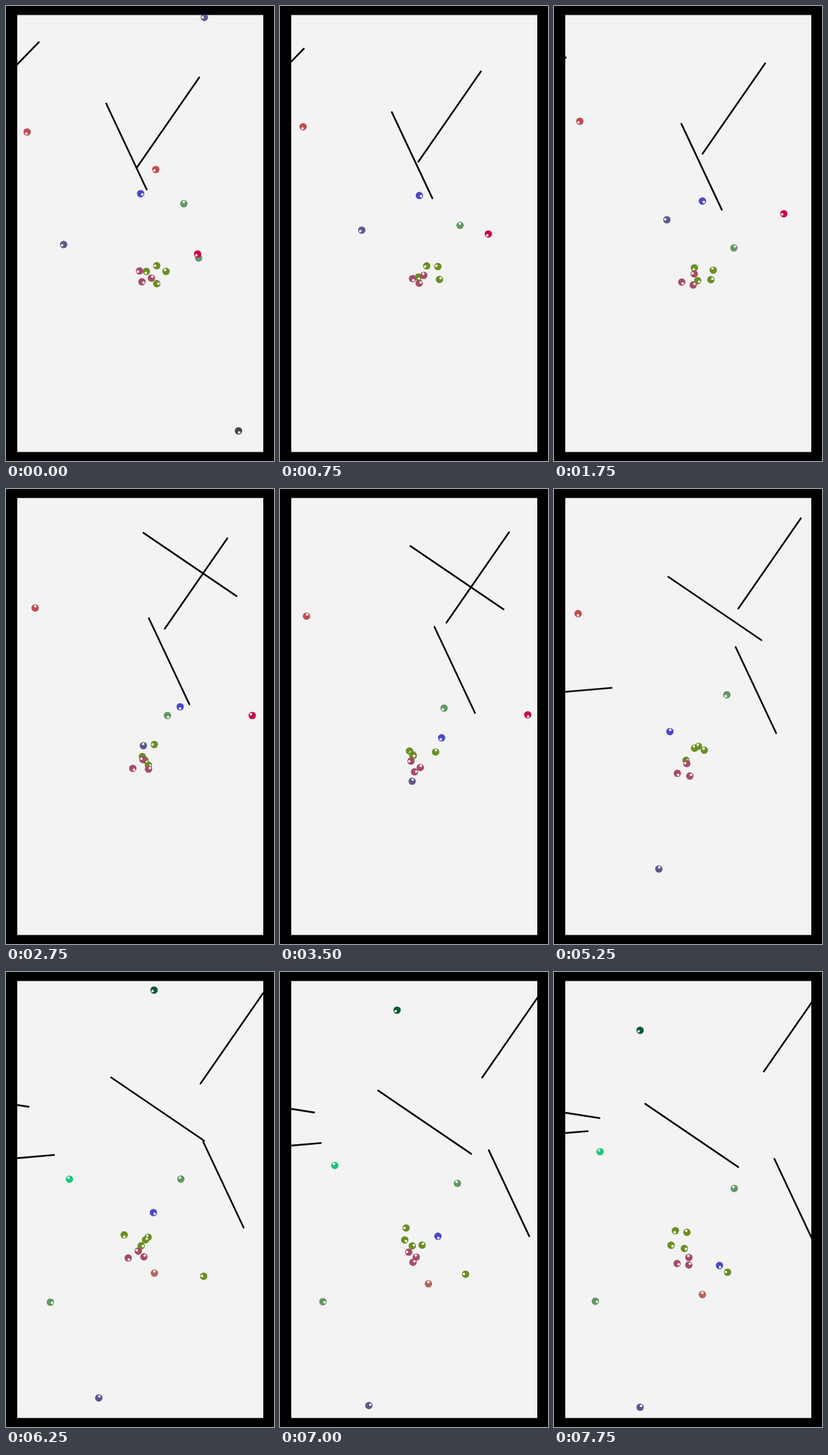
An HTML page with a canvas that plays this animation: 400 px wide and 679 px high, repeating every 8000 ms.

```html
<!DOCTYPE html>
<html lang="en">
<head>
<meta charset="utf-8">
<title>Balls and drifting lines</title>
<style>
  html, body { margin: 0; width: 100%; height: 100%; overflow: hidden; background: #000; }
  canvas { display: block; }
</style>
</head>
<body>
<canvas id="stage" width="400" height="679"></canvas>
<script>
const ctx = document.getElementById("stage").getContext("2d");
const LOOP = 8, STEP = 0.25, TAU = Math.PI * 2;
const OLIVE = "#6b8e23", MAUVE = "#a64c64", NAVY = "#5a5a8c", GREEN = "#649664", RED = "#c24c54";
const FORWARD = 1, BACKWARD = -1; // side of the highlight, relative to the motion

let seed = 7;
const random = () => (seed = seed * 16807 % 2147483647) / 2147483647;

const balls = [], lines = [];
const addBall = (color, facing, position, from = 0, to = LOOP) =>
  balls.push({ color, facing, position, from, to });

// Constant velocity, starting at (x, y) when it appears
function drifter(color, facing, [x, y], [vx, vy], from, to) {
  addBall(color, facing, t => [x + vx * (t - from), y + vy * (t - from)], from, to);
}

// Balls spread around a slowly drifting centre, each on its own wobbly orbit
function swarm(color, count, [cx, cy], [vx, vy], radius) {
  for (let i = 0; i < count; i++) {
    const phase = TAU * i / count, spin = 1 + random(), wobble = TAU * random();
    addBall(color, BACKWARD, t => {
      const r = radius * (0.8 + 0.3 * Math.sin(2 * t + wobble));
      const angle = phase + spin * t;
      return [cx + vx * t + r * Math.cos(angle), cy + vy * t + r * 0.8 * Math.sin(angle)];
    });
  }
}

// Smooth path through a few points at the shared key times
const KEY_TIMES = [0, 1.75, 2.75, 4.25, 5.25, 6.25, 7.75];
function traveller(color, facing, points, to) {
  const last = points.length - 1;
  const slope = (i, k) => {
    const a = Math.max(i - 1, 0), b = Math.min(i + 1, last);
    return (points[b][k] - points[a][k]) / (KEY_TIMES[b] - KEY_TIMES[a]);
  };
  addBall(color, facing, t => {
    const time = Math.min(Math.max(t, 0), KEY_TIMES[last]);
    let i = 0;
    while (i < last - 1 && KEY_TIMES[i + 1] <= time) i++;
    const span = KEY_TIMES[i + 1] - KEY_TIMES[i], u = (time - KEY_TIMES[i]) / span, v = 1 - u;
    return [0, 1].map(k =>
      points[i][k] * v * v * (1 + 2 * u) + points[i + 1][k] * u * u * (3 - 2 * u)
      + span * u * v * (slope(i, k) * v - slope(i + 1, k) * u));
  }, 0, to);
}

const addLine = (start, extent, velocity, from = 0, to = LOOP) =>
  lines.push({ start, extent, velocity, from, to });

addLine([149.5, 145.5], [60.5, 128.5], [23.15, 17.2]);
addLine([195, 241.5], [93.5, -135], [15.25, -12]);
addLine([49, 54], [-80, 82], [-18, 13], 0, 2);
addLine([243, -6.8], [139, 94.5], [-13.8, 26.25], 2.5);
addLine([160.8, 421.5], [-140, 12], [-14.25, -23.75], 5.25);
addLine([-108, 130.5], [-140, -22], [22.7, 11.3], 5.5);

drifter(NAVY, BACKWARD, [296, 17], [20, 0], 0, 0.25);
drifter("#48484a", FORWARD, [347, 634], [28, 62], 0, 0.5);
drifter(RED, BACKWARD, [223.5, 244], [15, -10], 0, 0.75);
drifter(GREEN, BACKWARD, [287.5, 376], [0, 14], 0, 0.75);
drifter(GREEN, BACKWARD, [67, 493], [-3, -1], 6, 8);
drifter("#14c878", FORWARD, [99, 316], [-17.3, -27.3], 6, 8);
drifter("#0a5a32", FORWARD, [221, 27], [-61.7, 40], 6.25, 8);
drifter("#b4645c", BACKWARD, [221.5, 444], [0, 21.3], 6, 8);
drifter(OLIVE, FORWARD, [295, 454], [-24, -4], 6.25, 8);

swarm(OLIVE, 4, [225, 396], [-4.2, 0], 21);
swarm(MAUVE, 3, [207, 406], [-1.5, 3], 14);

traveller(RED, BACKWARD, [[31.5, 188], [38.5, 172], [43.5, 177.5], [35, 199], [36, 186]], 5.75);
traveller("#c8064f", BACKWARD, [[286, 370], [343, 310], [367.5, 338], [368.5, 331]], 4.75);
traveller(GREEN, BACKWARD, [[265.5, 295], [268.5, 361], [241, 338], [253.5, 318], [258, 307], [261, 309], [269, 323]]);
traveller(NAVY, BACKWARD, [[86, 356], [168.5, 319], [205, 383], [180.5, 491], [156.5, 567], [138.5, 635.5], [128.5, 649.5]]);
traveller("#4a4ac8", FORWARD, [[201, 280], [221.5, 291], [260, 325], [211, 406], [173, 362], [220, 359], [247, 438]]);

function disc(x, y, r, color) {
  ctx.fillStyle = color;
  ctx.beginPath();
  ctx.arc(x, y, r, 0, TAU);
  ctx.fill();
}

function drawBall({ color, facing, position }, t) {
  const [x, y] = position(t);
  const [x0, y0] = position(t - 0.05), [x1, y1] = position(t + 0.05);
  const angle = Math.atan2(facing * (y1 - y0), facing * (x1 - x0));
  disc(x, y, 5.5, color);
  disc(x + 2.6 * Math.cos(angle), y + 2.6 * Math.sin(angle), 1.9, "#f4f4f4");
}

function drawLine({ start: [x, y], extent: [dx, dy], velocity: [vx, vy] }, t) {
  ctx.beginPath();
  ctx.moveTo(x + vx * t, y + vy * t);
  ctx.lineTo(x + dx + vx * t, y + dy + vy * t);
  ctx.stroke();
}

function draw(t) {
  const visible = item => t >= item.from && t < item.to;
  ctx.fillStyle = "#000";
  ctx.fillRect(0, 0, 400, 679);
  ctx.save();
  ctx.beginPath();
  ctx.rect(16.5, 13.3, 367.5, 652.5);
  ctx.clip();
  ctx.fillStyle = "#f3f3f3";
  ctx.fill();
  ctx.strokeStyle = "#0a0a0a";
  ctx.lineWidth = 2.6;
  ctx.lineCap = "round";
  lines.filter(visible).forEach(line => drawLine(line, t));
  balls.filter(visible).forEach(ball => drawBall(ball, t));
  ctx.restore();
}

function tick() {
  const t = performance.now() / 1000 % LOOP;
  draw(Math.floor(t / STEP) * STEP);
  requestAnimationFrame(tick);
}
tick();
</script>
</body>
</html>
```
